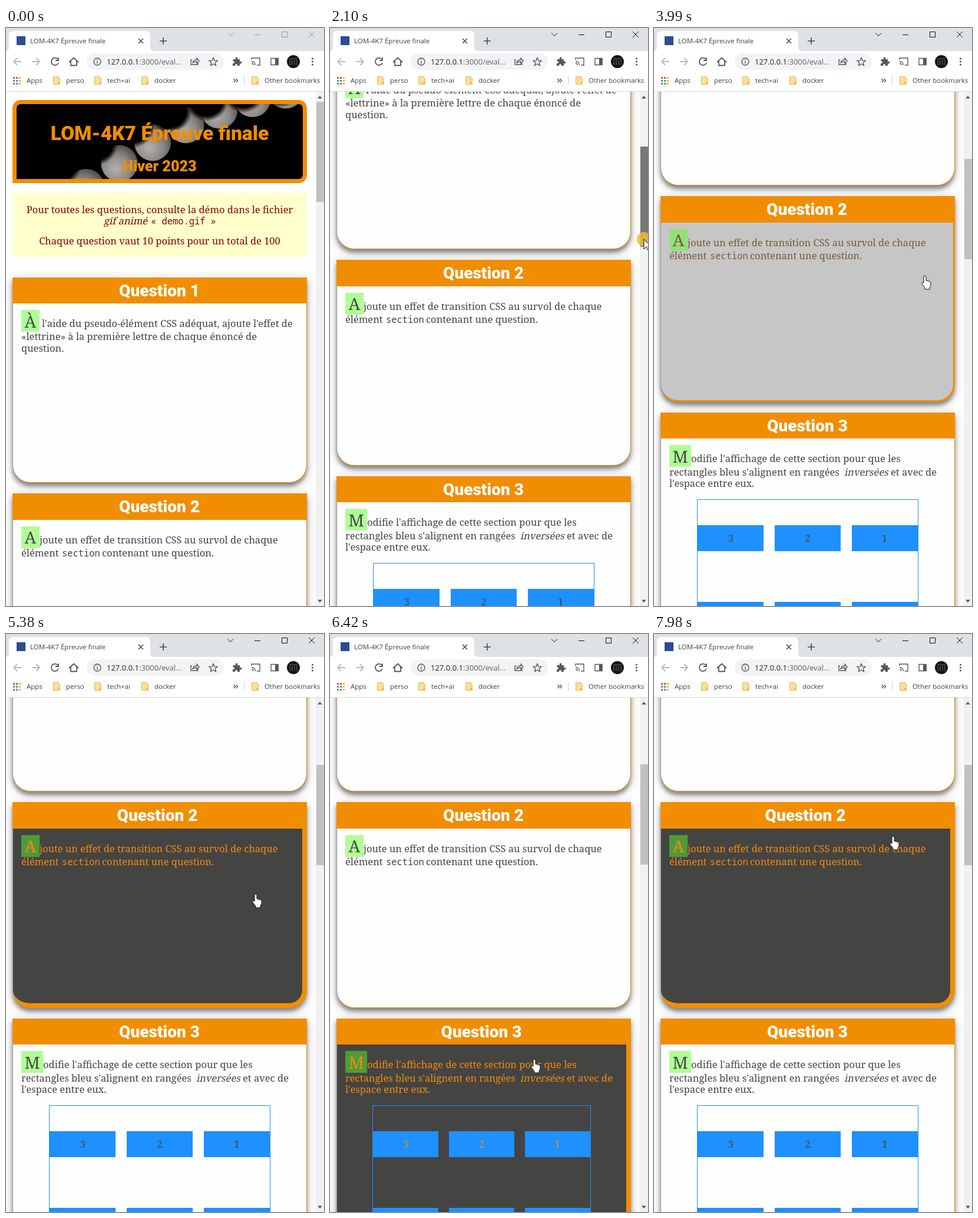
Recreate the animation shown at these times as an HTML page. Size 540 by 980 pixels, loop 8 s.

```html
<!DOCTYPE html>
<html lang="fr">
<head>
<meta charset="utf-8">
<title>Épreuve finale</title>
<style>
  html, body { margin: 0; width: 100%; height: 100%; overflow: hidden; background: #fefefe; }
  #stage { position: relative; width: 540px; height: 980px; overflow: hidden; }
  #view { position: absolute; top: 108px; width: 526px; height: 872px; overflow: hidden; }
  #page { position: absolute; top: -108px; left: 0; width: 526px; height: 1900px; }
  svg { position: absolute; left: 0; top: 0; overflow: visible; }
  text { white-space: pre; }
  #page text, li { font: 16.5px "Noto Serif", serif; }
  #page .mono { font: 15.4px "Noto Sans Mono", monospace; }
  #page .em { transform: skewX(-12deg); transform-box: fill-box; transform-origin: 0 80%; }
  #page .cap { font-size: 28px; }
  #page .h1 { font: 900 33.6px Roboto, sans-serif; }
  #page .h2 { font: 900 25.2px Roboto, sans-serif; }
  .ui { font: 11.5px "Open Sans", sans-serif; fill: #3c4043; }
  header { position: absolute; left: 11px; top: 122px; width: 500px; height: 141px; box-sizing: border-box;
    border: 7px solid #f18d00; border-radius: 14px 14px 14px 0; background: #000; }
  section { position: absolute; left: 11px; width: 500px; box-sizing: border-box;
    border: 0 solid #f18d00; border-left: 1px solid #999; border-radius: 0 0 30px 30px;
    box-shadow: 0 6px 7px rgba(0,0,0,.4), 0 4px 18px rgba(0,0,0,.19); }
  h2 { margin: 0 0 0 -1px; height: 44.5px; background: #f18d00; color: #fff; text-align: center;
    font: 900 28px/45px Roboto, sans-serif; }
  .capBox { position: absolute; left: 14px; top: 55.5px; height: 37px; }
  ul { position: relative; margin: 102.5px auto 0; padding: 43px 0 0; width: 75%; height: 300px; list-style: none;
    border: 1px solid #1e90ff; display: flex; flex-wrap: wrap; justify-content: space-between;
    align-content: flex-start; row-gap: 86px; }
  li { width: 30%; height: 44px; line-height: 44px; text-align: center; background: #1e90ff; }
</style>
</head>
<body>
<div id="stage">
  <div id="view"><div id="page">
    <header></header>
    <svg width="526" height="400">
      <defs>
        <clipPath id="sky"><rect x="18" y="129" width="486" height="127" rx="7"/></clipPath>
        <radialGradient id="moon" cx=".4" cy=".65" r=".65">
          <stop offset="0" stop-color="#b4b0ae"/><stop offset=".6" stop-color="#8b8785"/><stop offset="1" stop-color="#56534f"/>
        </radialGradient>
        <radialGradient id="shade">
          <stop offset=".75"/><stop offset="1" stop-opacity="0"/>
        </radialGradient>
      </defs>
      <g id="moons" clip-path="url(#sky)"></g>
      <g fill="#f18d00" text-anchor="middle">
        <text class="h1" x="261" y="190">LOM-4K7 Épreuve finale</text>
        <text class="h2" x="261" y="243">Hiver 2023</text>
      </g>
      <rect x="11" y="280" width="500" height="108" fill="#ffffcc"/>
      <g fill="#8b0000">
        <text x="261" y="314" text-anchor="middle">Pour toutes les questions, consulte la démo dans le fichier</text>
        <text class="em" x="166" y="333">gif animé</text>
        <text class="mono" x="246" y="333">« demo.gif »</text>
        <text x="261" y="367" text-anchor="middle">Chaque question vaut 10 points pour un total de 100</text>
      </g>
    </svg>
    <div id="questions"></div>
  </div></div>

  <svg width="540" height="980">
    <rect width="540" height="108" fill="#fff"/>
    <rect width="540" height="39" fill="#dee1e6"/>
    <path d="M0 39q5 0 5-7V13q0-8 8-8h224q8 0 8 8v19q0 7 6 7z" fill="#fff"/>
    <rect x="18" y="14" width="15" height="15" fill="#2b4c93"/>
    <text class="ui" x="41" y="26">LOM-4K7 Épreuve finale</text>
    <g fill="none" stroke="#45494d" stroke-width="1.6">
      <path d="M225 18l8 8m0-8l-8 8M261 22h12m-6-6v12"/>
      <g id="controls" stroke-width="1"><path d="M376 8.500l5 5 5-5M422 11.500h10M468.500 6.500h9v9h-9zM514 6l10 10m0-10l-10 10"/></g>
    </g>
    <rect x="137" y="43" width="233" height="28" rx="14" fill="#f1f3f4"/>
    <g fill="none" stroke="#54585c" stroke-width="1.8">
      <path d="M26 57H13m6-6l-6 6 6 6M44 57h13m-6-6l6 6-6 6" stroke="#b9bbbe"/>
      <path d="M88 53a6.200 6.200 0 1 0 1 6M89 50v5h-5M107 58l8-7.500 8 7.500M110 56v7.500h10V56"/>
      <g stroke-width="1.400">
        <circle cx="155" cy="57" r="6"/><path d="M155 56v4.500m0-7.500v1.500"/>
        <path d="M316 54h-2v8h12v-3M317 59q1-5 7-5v-3l4 4.500-4 4.500v-3q-4 0-7 2z"/>
        <path d="M352 50.500l2 4.600 5 .4-3.800 3.200 1.200 4.900-4.400-2.600-4.400 2.600 1.200-4.900-3.800-3.200 5-.4z"/>
        <path d="M417 54v-3h14v12h-5M417 56.500a6.500 6.500 0 0 1 6.500 6.500M417 60a3 3 0 0 1 3 3"/>
        <path d="M450 51.500h12v11h-12z"/>
      </g>
    </g>
    <g fill="#54585c">
      <path d="M386 53h4q-1-3.500 1.500-3.500T393 53h4v4q3.500-1 3.500 1.500T397 60v4h-4q0-3-2-3t-2 3h-4v-4q3 0 3-2t-3-2z"/>
      <path d="M457 51h5.500v12H457z"/>
      <circle cx="520.500" cy="52" r="1.600"/><circle cx="520.500" cy="57" r="1.600"/><circle cx="520.500" cy="62" r="1.600"/>
    </g>
    <circle cx="488" cy="57" r="11" fill="#111"/>
    <path d="M482 54v9m4-9v9m4-9v9m4-9v9M481 52h14" stroke="#777" stroke-width="1"/>
    <text class="ui" x="171" y="62" style="font-size:13px"><tspan fill="#202124">127.0.0.1</tspan><tspan fill="#5f6368">:3000/eval...</tspan></text>
    <g id="apps"></g>
    <g id="folders"></g>
    <g class="ui">
      <text x="35" y="93">Apps</text><text x="102" y="93">perso</text><text x="172" y="93">tech+ai</text>
      <text x="252" y="93">docker</text><text x="439" y="93">Other bookmarks</text>
    </g>
    <path d="M386.500 86l3 3-3 3m4-6l3 3-3 3" fill="none" stroke="#45494d" stroke-width="1.300"/>
    <path d="M404.500 81v16" stroke="#d0d2d5"/>
    <path d="M0 107.500h540" stroke="#d5d7da"/>
    <rect x="526" y="108" width="14" height="872" fill="#f1f1f1"/>
    <path d="M529 119.500l4-4.500 4 4.500zM529 969.500l4 4.500 4-4.500z" fill="#555"/>
    <rect id="thumb" x="527" width="13" height="170"/>
    <g id="cursor">
      <circle id="halo" r="12" fill="#edbd32" opacity=".85"/>
      <path id="arrow" d="M0 0v17l4-4 3 6 2.500-1-3-6H12z" fill="#fff" stroke="#000"/>
      <path id="hand" d="M-2 12V2a2 2 0 0 1 4 0v6l6 1.500q2 .5 2 3V16l-2 4v3H0v-2.500l-5-6.500q-1-2 .8-2.600z" fill="#fff" stroke="#111"/>
    </g>
  </svg>
</div>
<script>
const $ = id => document.getElementById(id);
const LOOP = 8000, PRESS = 900, RELEASE = 2840;

// Each moon along the arc is covered further from the upper left
$("moons").innerHTML = Array.from({ length: 7 }, (_, i) => {
  const x = 136 + 56.5 * i, y = 270 - 43 * i + 2.6 * i * i, gap = 60 - 8 * i;
  return `<circle cx="${x}" cy="${y}" r="31" fill="url(#moon)"/>
    <circle cx="${x - .75 * gap}" cy="${y - .65 * gap}" r="37" fill="url(#shade)"/>`;
}).join("");

const dotColors = ["#ea4335", "#ea4335", "#fbbc04", "#34a853", "#4285f4", "#fbbc04", "#34a853", "#4285f4", "#fbbc04"];
$("apps").innerHTML = dotColors.map((c, i) =>
  `<rect x="${12 + i % 3 * 5}" y="${83 + Math.floor(i / 3) * 5}" width="3" height="3" fill="${c}"/>`).join("");
$("folders").innerHTML = [80, 150, 230, 417].map(x =>
  `<path d="M${x + .5} 82.500h9v3h2v10h-11z" fill="#ffdf94" stroke="#e3b75a"/><path d="M${x + 8} 91h4v5h-4z" fill="#f2c060"/>`).join("");

// Each line: x, offset from the section top, text, class
const questions = [
  { height: 348.5, cap: "À", capWidth: 31, lines: [
    [61, 84, "l'aide du pseudo-élément CSS adéquat, ajoute l'effet de"],
    [26, 106, "«lettrine» à la première lettre de chaque énoncé de"],
    [26, 126, "question."]] },
  { height: 348.5, cap: "A", capWidth: 31, lines: [
    [57, 85, "joute un effet de transition CSS au survol de chaque"],
    [26, 107, "élément"], [95, 107, "section", "mono"], [163, 107, "contenant une question."]] },
  { height: 600, cap: "M", capWidth: 37, list: true, lines: [
    [63, 84, "odifie l'affichage de cette section pour que les"],
    [26, 107, "rectangles bleu s'alignent en rangées"], [323, 107, "inversées", "em"], [402, 107, "et avec de"],
    [26, 126, "l'espace entre eux."]] }
];
const listHtml = `<ul>${[3, 2, 1, 6, 5, 4].map(n => `<li>${n}</li>`).join("")}</ul>`;
$("questions").innerHTML = questions.map((q, i) => `
  <section style="top:${422.7 + 366.6 * i}px;height:${q.height}px">
    <h2>Question ${i + 1}</h2>${q.list ? listHtml : ""}
    <div class="capBox" style="width:${q.capWidth}px"></div>
    <svg width="490" height="140" fill="currentColor">
      <text class="cap" x="19.500" y="85">${q.cap}</text>
      ${q.lines.map(([x, y, s, c = ""]) => `<text class="${c}" x="${x - 12}" y="${y}">${s}</text>`).join("")}
    </svg>
  </section>`).join("");
const sections = [...document.querySelectorAll("section")];

const clamp = v => Math.min(1, Math.max(0, v));

function track(t, keys, col = 1) {
  if (t <= keys[0][0]) return keys[0][col];
  const i = keys.findIndex(k => k[0] > t);
  if (i < 0) return keys[keys.length - 1][col];
  const a = keys[i - 1], b = keys[i];
  return a[col] + (b[col] - a[col]) * (t - a[0]) / (b[0] - a[0]);
}

// The CSS "ease" curve
function ease(x) {
  const bez = (a, b, u) => 3 * a * u * (1 - u) ** 2 + 3 * b * u * u * (1 - u) + u ** 3;
  let lo = 0, hi = 1;
  for (let i = 0; i < 20; i++) {
    const mid = (lo + hi) / 2;
    if (bez(.25, .25, mid) < x) lo = mid; else hi = mid;
  }
  return bez(.1, 1, lo);
}
const fade = (t, start) => t <= start ? 0 : t >= start + 500 ? 1 : ease((t - start) / 500);

const mix = (a, b, p) => `rgb(${a.map((v, i) => Math.round(v + (b[i] - v) * p))})`;

function styleSection(el, p) {
  el.style.background = mix([254, 254, 254], [68, 68, 66], p);
  el.style.color = mix([68, 68, 68], [246, 138, 14], p);
  const border = Math.floor(1 + 7 * clamp(p) + .01);
  el.style.borderRightWidth = el.style.borderBottomWidth = border + "px";
  el.querySelector(".capBox").style.background = mix([176, 253, 150], [79, 155, 56], p);
}

const scrollKeys = [[900, 0], [1150, 10], [1470, 72], [1800, 236], [2100, 396], [2370, 484], [2450, 496], [2510, 504]];
const passKeys = [[70, 530, 930], [210, 524, 819]];
const dragXKeys = [[740, 538], [1470, 536.5], [2100, 533]];
const handKeys = [[3510, 539, 385], [3890, 508, 402], [3990, 460, 420], [4250, 424, 441], [5380, 424, 441],
  [5880, 375, 636], [6420, 347, 721], [6950, 347, 721], [7090, 352, 655], [7140, 356, 632],
  [7640, 391, 541], [7720, 391, 541], [7980, 406, 343]];

function pointer(t) {
  if (t >= 70 && t < 210) return [track(t, passKeys), track(t, passKeys, 2)];
  if (t >= 740 && t < RELEASE) return [track(t, dragXKeys), 281 + track(t, scrollKeys) / 5.15];
  if (t >= 3510) return [track(t, handKeys), track(t, handKeys, 2)];
  return null;
}

const show = (el, on) => el.setAttribute("visibility", on ? "visible" : "hidden");

function render(t) {
  const scroll = Math.round(track(t, scrollKeys));
  const second = fade(t, 3890) - fade(t, 5880) + fade(t, 7140);
  const third = fade(t, 5920) - fade(t, 7090);
  [0, second, third].forEach((p, i) => styleSection(sections[i], p));
  $("page").style.transform = `translateY(${-scroll}px)`;

  const at = pointer(t);
  const pressed = t >= PRESS && t < RELEASE;
  const thumb = $("thumb");
  thumb.setAttribute("y", Math.round(124.6 + scroll / 5.15 - third));
  thumb.setAttribute("fill", pressed ? "#787878" : at && at[0] > 526 && t > 700 ? "#a8a8a8" : "#c1c1c1");
  $("controls").setAttribute("stroke", t >= PRESS ? "#111" : "#999");

  const hand = t >= 3890;
  show($("halo"), at && pressed);
  show($("arrow"), at && !hand);
  show($("hand"), at && hand);
  if (at) $("cursor").setAttribute("transform", `translate(${at.map(v => Math.round(v))})`);
}

const start = performance.now();
function tick() {
  render((performance.now() - start) % LOOP);
  requestAnimationFrame(tick);
}
tick();
</script>
</body>
</html>
```
